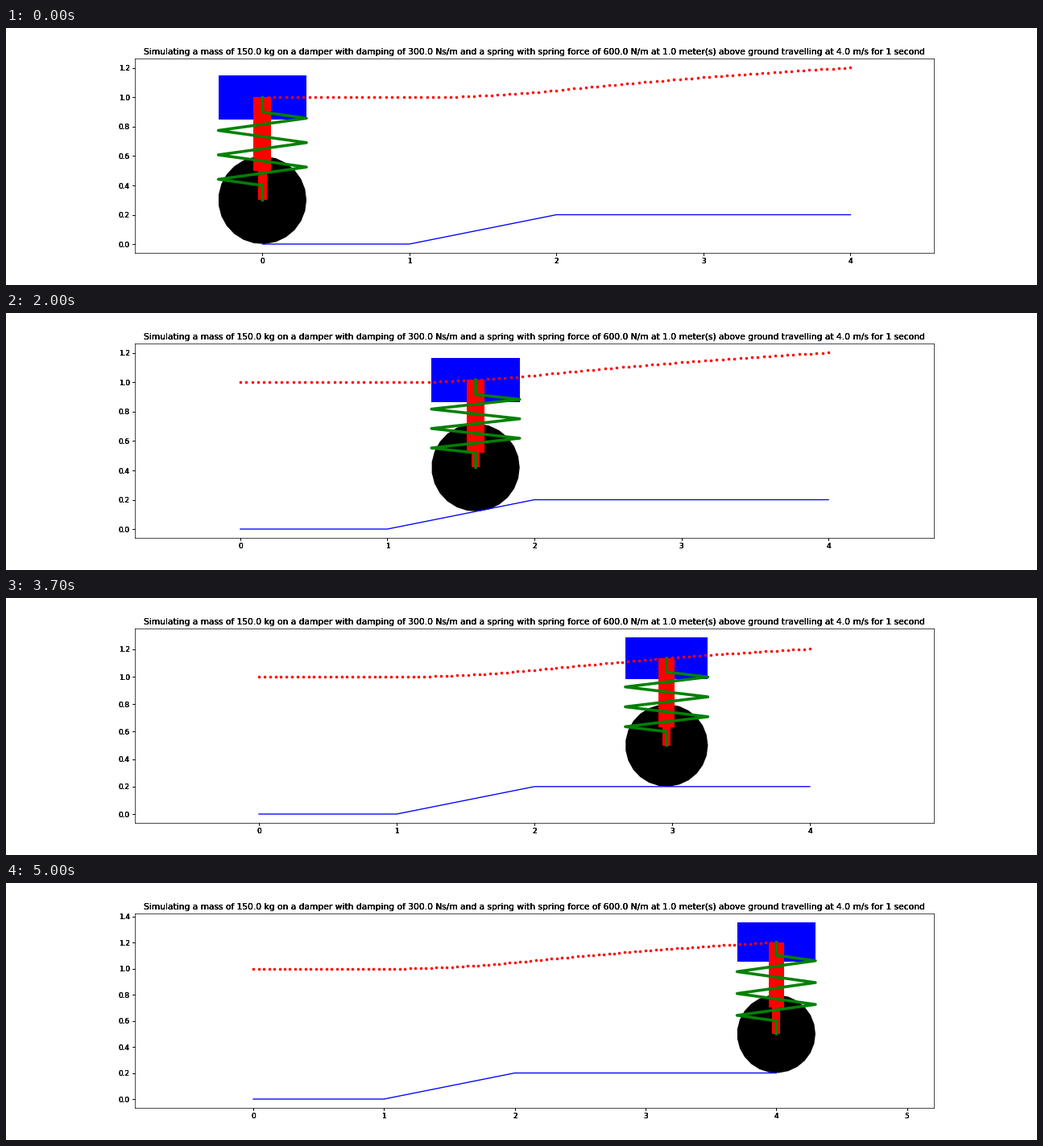
These frames come from a looping animation (1280 px wide and 320 px high, 5.05 s). A matplotlib script:

```python
import numpy as np
import matplotlib.pyplot as plt
from matplotlib.animation import FuncAnimation
from matplotlib.axes import Axes
from matplotlib.patches import Polygon, Rectangle
from matplotlib.ticker import MultipleLocator

MASS, DAMPING, STIFFNESS = 150.0, 300.0, 600.0
HEIGHT, SPEED, DURATION = 1.0, 4.0, 1
STEPS = 100
RADIUS = 0.3
RISE = 0.2
TITLE = (f"Simulating a mass of {MASS} kg on a damper with damping of {DAMPING} Ns/m "
         f"and a spring with spring force of {STIFFNESS} N/m at {HEIGHT} meter(s) "
         f"above ground travelling at {SPEED} m/s for {DURATION} second")


class HeavyAxes(Axes):
    """Axes whose lettering is laid down several times for a heavier look."""

    def draw(self, renderer):
        super().draw(renderer)
        for artist in (self.xaxis, self.yaxis, self.title) * 3:
            artist.draw(renderer)


def road(x):
    return np.interp(x, [1, 2], [0, RISE])


def ramp_response(t):
    """Height of the sprung mass after an endless ramp that starts at t = 0."""
    t = np.maximum(t, 0)
    decay = DAMPING / (2 * MASS)
    omega = np.sqrt(STIFFNESS / MASS - decay ** 2)
    return RISE * SPEED * (t - np.exp(-decay * t) * np.sin(omega * t) / omega)


def mass_height(x):
    t = x / SPEED
    return HEIGHT + ramp_response(t - 1 / SPEED) - ramp_response(t - 2 / SPEED)


def spring_points(x, low, high):
    k = np.arange(6)
    coil_y = low + 0.1 + (high - low - 0.2) * (k + 0.5) / 6
    coil_x = x + RADIUS * np.where(k % 2, 1, -1)
    xs = np.r_[x, x, coil_x, x, x]
    ys = np.r_[low, low + 0.1, coil_y, high - 0.1, high]
    return xs, ys


track = np.linspace(0, SPEED * DURATION, STEPS + 1)
path = mass_height(track)
angles = np.arange(25) * 2 * np.pi / 25
rim = RADIUS * np.column_stack([np.cos(angles), np.sin(angles)])

fig = plt.figure(figsize=(20, 5), dpi=64, facecolor="white")
fig.subplots_adjust(left=0.125, right=0.9, bottom=0.125, top=0.88)
ax = fig.add_subplot(axes_class=HeavyAxes)
ax.set_title(TITLE)
ax.xaxis.set_major_locator(MultipleLocator(1))
ax.yaxis.set_major_locator(MultipleLocator(0.2))
ratio = (0.775 * 1280) / (0.755 * 320)

body = ax.add_patch(Rectangle((0, 0), 2 * RADIUS, 0.3, fc="b"))
wheel = ax.add_patch(Polygon(rim, fc="k"))
rod = ax.add_patch(Rectangle((0, 0), 0.06, 0.2, fc="r"))
tube = ax.add_patch(Rectangle((0, 0), 0.12, 0.5, fc="r"))
ax.plot(track, road(track), "b", lw=1.5)
ax.plot(track, path, "r.", ms=6)
spring, = ax.plot([], [], "g", lw=4)


def update(i):
    x, z = track[i], path[i]
    hub = road(x) + RADIUS
    body.set_xy((x - RADIUS, z - 0.15))
    wheel.set_xy(rim + [x, hub])
    tube.set_xy((x - 0.06, z - 0.5))
    rod.set_xy((x - 0.03, hub))
    rod.set_height(z - 0.4 - hub)
    spring.set_data(*spring_points(x, hub, z))

    # Fit everything with a 5 % margin and equal scales on both axes.
    top = max(path.max(), z + 0.15)
    middle = (min(0, x - RADIUS) + max(track[-1], x + RADIUS)) / 2
    half = ratio * 1.1 * top / 2
    ax.set_xlim(middle - half, middle + half)
    ax.set_ylim(-0.05 * top, 1.05 * top)
    return body, wheel, tube, rod, spring


anim = FuncAnimation(fig, update, frames=STEPS + 1, interval=50,
                     repeat=True, repeat_delay=0, blit=False)
plt.show()
```
